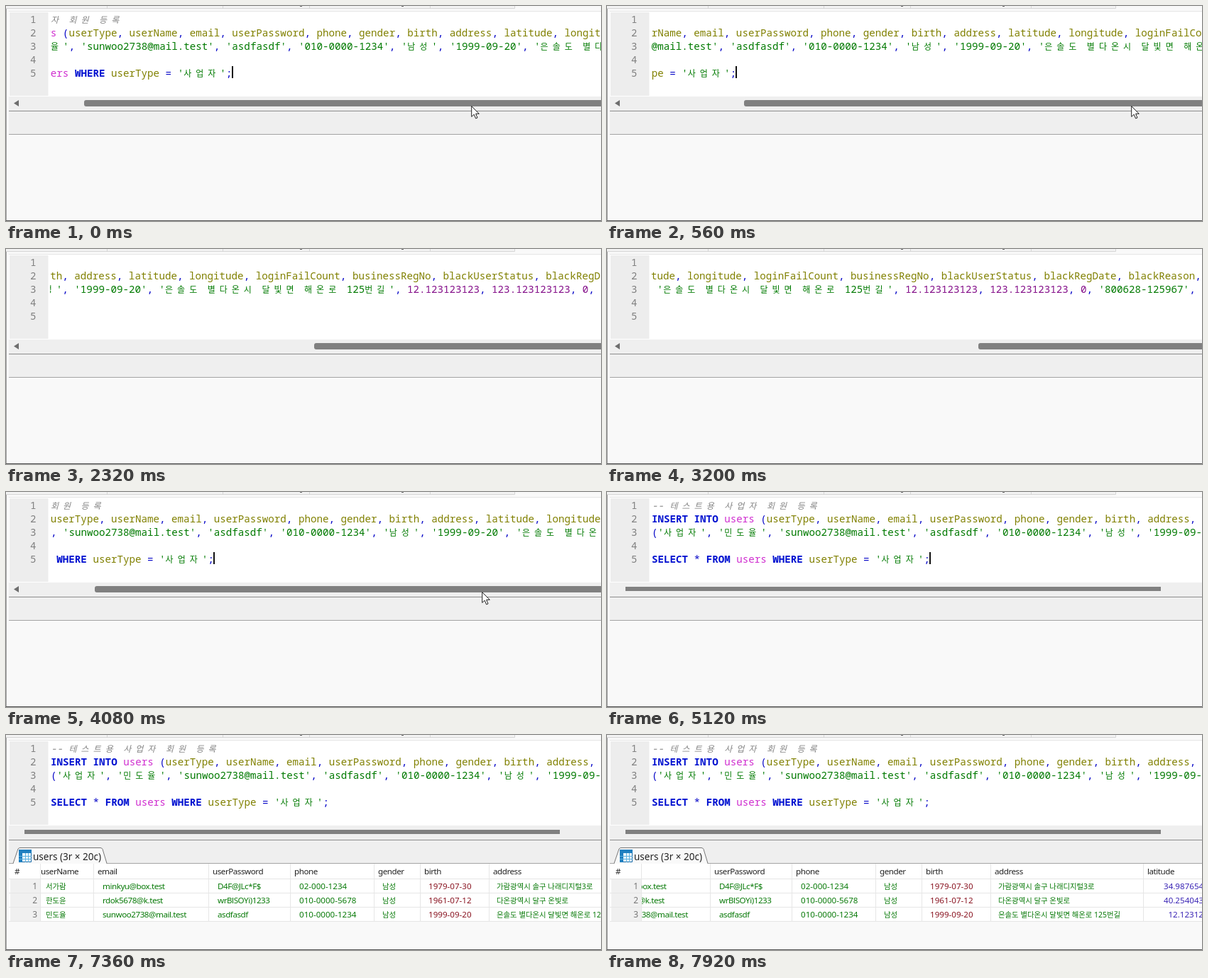
Animation, 838 px wide and 304 px high, one loop 8000 ms. Source, as an HTML page:

```html
<!DOCTYPE html>
<html lang="ko">
<head>
<meta charset="utf-8">
<title>SQL editor</title>
<style>
html, body { margin: 0; width: 100%; height: 100%; overflow: hidden; background: #f9f9f9; }
#stage { position: relative; width: 838px; height: 304px; overflow: hidden; background: #f9f9f9; }
#stage svg, #stage div { position: absolute; }
#stage svg { left: 0; top: 0; }
.mono { font: 14.208px/19px 'Noto Sans Mono', 'DejaVu Sans Mono', monospace; white-space: pre; }
.mono i { display: inline-block; width: 17.05px; font: 12px/12px 'Noto Sans CJK KR', 'Noto Sans CJK', sans-serif; }
.mono .rem i { font-style: italic; }
.kw { color: #0010d0; font-weight: bold; }
.tbl { color: #d02fd0; }
.col { color: #808000; }
.str { color: #007a00; }
.num { color: #85108a; }
.sym { color: #0808c8; }
.rem { color: #858585; font-style: italic; }
#gutter { left: 34px; top: 9px; color: #808080; }
#code { left: 62px; top: 9px; width: 776px; height: 118px; overflow: hidden; }
#lines { left: 1px; top: 0; }
#caret { width: 2px; height: 17px; top: 76px; background: #111; }
#thumb { background: #808080; width: 754px; }
.t { font: 11.6px/20px 'Noto Sans', 'Noto Sans CJK KR', 'Noto Sans CJK', sans-serif; white-space: pre; color: #222; }
.w { letter-spacing: -.45px; }
.k { font-size: 10.4px; }
.g { color: #087a08; }
.d { color: #8a1522; }
.n { color: #3a25b5; width: 56px; text-align: right; }
.id { color: #1010b0; font-weight: bold; }
.no { color: #777; font-size: 12px; width: 38px; text-align: right; }
.tab { font-size: 13.5px; }
#view { left: 49px; top: 182px; width: 789px; height: 82px; overflow: hidden; }
#cols { left: -49px; top: -182px; }
</style>
</head>
<body>
<div id="stage">
  <svg width="838" height="304">
    <path fill="#f3f3f3" d="M0 0h716v3H0z"/>
    <path fill="none" stroke="#d6d6d6" d="M0 3.5H716.5V0M142.5 0v3M305.5 0v3M427.5 0v3M597.5 0v3"/>
    <path fill="#666" d="M414 0h3v1h-3zM557 0h3v1h-3z"/>
    <path fill="#fff" d="M4 8h834v120H4z"/>
    <path fill="#e6e6e6" d="M4 7h834v1H4z"/>
    <path fill="#ededed" d="M5 9h54.500v118H5z"/>
    <path fill="#efefef" d="M4 128h834v53H4z"/>
    <path fill="#8c8c8c" d="M4 148h834v1H4z"/>
    <path fill="#a4a4a4" d="M4 181h834v1H4zM0 4h1v300H0z"/>
    <path fill="#555" d="M0 303h838v1H0z"/>
    <path id="arrow" fill="#6e6e6e" d="M18 133v9l-7-4.500z"/>
  </svg>
  <div id="gutter" class="mono">1
2
3
4
5</div>
  <div id="code"><div id="lines" class="mono"></div><div id="caret"></div></div>
  <div id="thumb"></div>
  <div id="grid" style="left:0;top:0">
    <svg width="838" height="304">
      <path fill="#fff" d="M4 182h834v81H4z"/>
      <path fill="#f0f0f0" d="M6 203h42v60H6z"/>
      <path fill="#f9f9f9" stroke="#777" d="M10 181.500L17 161q1-1.500 3-1.500H133q2 0 3 2L142 181.500"/>
      <path fill="#f9f9f9" d="M11 181h130v1H11z"/>
      <path fill="#e9f5fc" stroke="#1c6ca8" d="M18.500 162.500h17v17h-17z"/>
      <path fill="#1f7fc0" d="M18 162h18v5H18zM18 162h5v18h-5z"/>
      <path stroke="#5fb2e0" d="M18 171.500h18M18 175.500h18M27.500 167v13M31.500 167v13"/>
      <path stroke="#e6e6e6" d="M4 203.500H838M4 223.500H838M4 243.500H838M4 263.500H838M48.500 182V263"/>
    </svg>
    <div id="view"><div id="cols">
      <svg id="rules" width="1240" height="304">
        <g stroke="#e4a31c" fill="none"><circle cx="112" cy="191" r="4.600" stroke-width="4"/>
        <path d="M112 195v9M112 199.500h4M112 203h3" stroke-width="2.400"/></g>
      </svg>
    </div></div>
  </div>
  <svg id="mouse" width="14" height="21"><path fill="#fff" stroke="#222" stroke-linejoin="round" d="M.7.7V15.500L4.200 12.300 6.600 18 9 17 6.600 11.400H11.300Z"/></svg>
</div>
<script>
const $ = id => document.getElementById(id);
const CELL = 8.525, DRAG = 5.23, STEP = 80, LOOP = 8000;

const sql = [
  "-- 테스트용 사업자 회원 등록",
  "INSERT INTO users (userType, userName, email, userPassword, phone, gender, birth, address, latitude, longitude, " +
    "loginFailCount, businessRegNo, blackUserStatus, blackRegDate, blackReason,",
  "('사업자', '민도율', 'sunwoo2738@mail.test', 'asdfasdf', '010-0000-1234', '남성', '1999-09-20', " +
    "'은솔도 별다온시 달빛면 해온로 125번길', 12.123123123, 123.123123123, 0, '800628-125967',",
  "",
  "SELECT * FROM users WHERE userType = '사업자';"
];

const kinds = [
  [/^--/, "rem"], [/^(INSERT|INTO|SELECT|FROM|WHERE)$/, "kw"], [/^users$/, "tbl"],
  [/^'/, "str"], [/^\d/, "num"], [/^\w/, "col"], [/./, "sym"]
];
const wide = s => s.replace(/[가-힣]/g, "<i>$&</i>");
const paint = line => line.replace(/--.*|'[^']*'|[\w.]+|[^\s\w]/g, s =>
  `<span class="${kinds.find(k => k[0].test(s))[1]}">${wide(s)}</span>`);
$("lines").innerHTML = sql.map(paint).join("\n");

function put(parent, x, y, text, cls) {
  const el = document.createElement("div");
  el.className = "t " + cls;
  el.style.left = x + "px";
  el.style.top = y - 10 + "px";
  el.textContent = text;
  parent.append(el);
}

// left edge, title, cell inset, cell classes, cells
const columns = [
  [48, "userId", 59, "id", ["11", "12", "13"]],
  [128, "userType", 12, "g k", ["사업자", "사업자", "사업자"]],
  [204, "userName", 12, "g k", ["서가람", "한도윤", "민도율"]],
  [284, "email", 12, "g w", ["minkyu@box.test", "rdok5678@k.test", "sunwoo2738@mail.test"]],
  [446, "userPassword", 12, "g w", ["D4F@JLc*F$", "wrBlSOYi)1233", "asdfasdf"]],
  [561, "phone", 12, "g", ["02-000-1234", "010-0000-5678", "010-0000-1234"]],
  [679, "gender", 11, "g k", ["남성", "남성", "남성"]],
  [744, "birth", 11, "d", ["1979-07-30", "1961-07-12", "1999-09-20"]],
  [841, "address", 10, "g k", ["가람광역시 솔구 나래디지털3로", "다온광역시 달구 온빛로", "은솔도 별다온시 달빛면 해온로 125번길"]],
  [1056, "latitude", 28, "n", ["34.987654", "40.254043", "12.12312"]]
];
const rowY = i => 213.5 + i * 20;
const rules = columns.slice(1).map(c => `M${c[0] - .5} 182V263`).join("");
$("rules").insertAdjacentHTML("beforeend", `<path stroke="#e6e6e6" d="${rules}"/>`);
for (const [x, title, inset, cls, cells] of columns) {
  put($("cols"), x + 5, 193, title, "w");
  cells.forEach((s, i) => put($("cols"), x + inset, rowY(i), s, cls));
}
put($("grid"), 12, 193, "#", "");
put($("grid"), 38, 172, "users (3r × 20c)", "tab");
[1, 2, 3].forEach((n, i) => put($("grid"), 6, rowY(i), n, "no"));

// [time, value...] tables
const scroll = [[0, 16], [560, 32], [1520, 62], [3200, 95], [3440, 95], [4240, 0]];
const slide = [[6720, 0], [7920, 300]];
const path = [[4240, 571, 141], [4400, 575, 156], [4900, 600, -22], [5360, 600, -22], [6080, 600, 306]];

function at(table, t) {
  const i = table.findIndex(k => k[0] > t);
  if (i === 0) return table[0].slice(1);
  if (i < 0) return table[table.length - 1].slice(1);
  const a = table[i - 1], b = table[i], p = (t - a[0]) / (b[0] - a[0]);
  return a.slice(1).map((v, j) => v + (b[j + 1] - v) * p);
}
const move = (el, x, y) => el.style.transform = `translate(${x}px,${y}px)`;

function draw(t) {
  const chars = Math.round(at(scroll, t)[0]);
  const hover = t < 4560, left = 26 + chars * DRAG;
  move($("lines"), -chars * CELL, 0);
  $("caret").style.left = (46 - chars) * CELL + "px";
  $("caret").style.visibility = t < 5200 ? "visible" : "hidden";
  Object.assign($("thumb").style, {
    left: left + "px",
    top: (hover ? 133 : 134) + "px",
    height: (hover ? 9 : 6) + "px",
    borderRadius: hover ? "3px" : "0"
  });
  $("arrow").style.visibility = hover ? "visible" : "hidden";
  $("grid").style.display = t >= 5200 ? "block" : "none";
  move($("cols"), -Math.round(at(slide, t)[0]), 0);
  const [mx, my] = t < 4240 ? [left + 545, 141] : at(path, t);
  move($("mouse"), Math.round(mx), Math.round(my));
}

const start = performance.now();
function tick(now) {
  const t = Math.max(0, now - start) % LOOP;
  draw(Math.floor(t / STEP) * STEP);
  requestAnimationFrame(tick);
}
draw(0);
requestAnimationFrame(tick);
</script>
</body>
</html>
```
